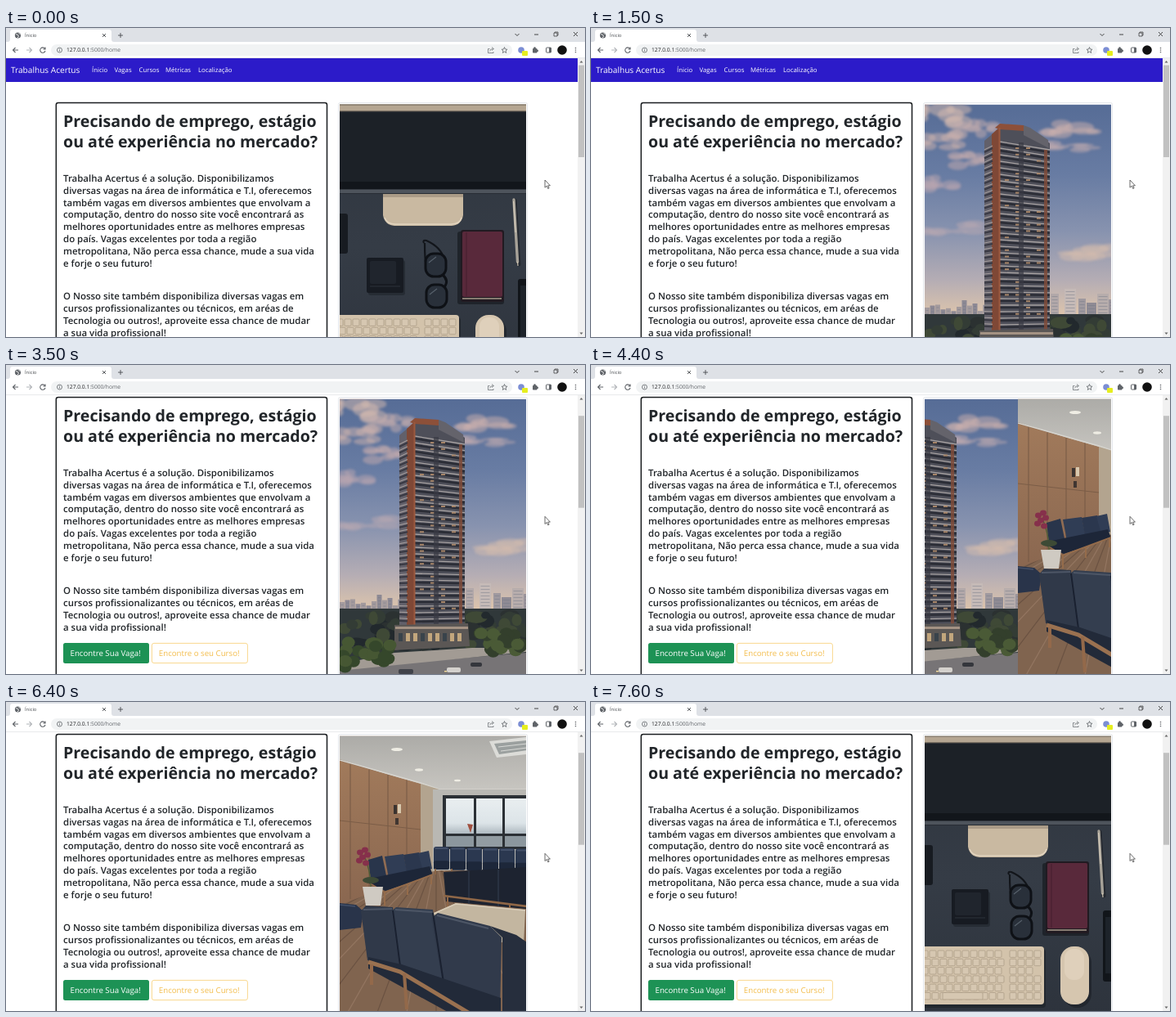
An HTML page that plays this animation: 708x378 px, repeating every 8000 ms.

```html
<!DOCTYPE html>
<html lang="pt">
<head>
<meta charset="utf-8">
<title>Ínicio</title>
<style>
html, body { margin: 0; width: 100%; height: 100%; overflow: hidden; background: #fff; }
svg { display: block; width: 708px; height: 378px; }
text { font-family: "Open Sans", "Noto Sans", sans-serif; text-rendering: geometricPrecision; white-space: pre; }
</style>
</head>
<body>
<svg id="stage" viewBox="0 0 708 378" xmlns="http://www.w3.org/2000/svg"></svg>
<script>
const LOOP = 8000, SCROLL = 52, IMG_W = 228;
const SLIDES = [1300, 4300, 7400];

const rect = (x, y, w, h, fill, more = '') =>
  `<rect x="${x}" y="${y}" width="${w}" height="${h}" fill="${fill}" ${more}/>`;
const poly = (pts, fill, more = '') => `<polygon points="${pts}" fill="${fill}" ${more}/>`;
const oval = (x, y, rx, ry, fill, more = '') =>
  `<ellipse cx="${x}" cy="${y}" rx="${rx}" ry="${ry}" fill="${fill}" ${more}/>`;
const line = (d, color, w = 1, more = '') =>
  `<path d="${d}" fill="none" stroke="${color}" stroke-width="${w}" ${more}/>`;
const text = (x, y, size, str, fill = '#212529', weight = 400) =>
  `<text x="${x}" y="${y}" font-size="${size}" fill="${fill}" font-weight="${weight}">${str}</text>`;
const group = (str, more = '') => `<g ${more}>${str}</g>`;
const times = (n, f) => Array.from({ length: n }, (_, i) => f(i)).join('');
const grad = (id, ...stops) => `<linearGradient id="${id}" x1="0" y1="0" x2="0" y2="1">` +
  stops.map(([at, c]) => `<stop offset="${at}" stop-color="${c}"/>`).join('') + '</linearGradient>';

function seeded(seed) {
  return () => (seed = (seed * 16807) % 2147483647) / 2147483647;
}

function desk() {
  const key = (x, y, w = 8) => rect(x, y, w, 8.4, '#d6c7b1', 'rx="1.2" stroke="#a89983" stroke-width=".7"');
  const keys = times(6, r => times(10, c => key(404 + c * 10 + (r % 2) * 3, 356 + r * 10.3)) +
    times(4, c => r === 2 && c === 3 ? '' : key(512 + c * 10, 356 + r * 10.3)));
  return rect(408, 93, 229, 348, 'url(#deskTop)') +
    rect(408, 93, 229, 9, '#b5a692') + rect(408, 93, 229, 2, '#8f8373') +
    rect(408, 101, 229, 1.5, '#776d60') +
    rect(408, 102.5, 229, 95, '#1c2127') + rect(408, 188, 229, 9.5, '#12161b') +
    rect(408, 197.5, 229, 5, '#4e545c') + rect(408, 202, 229, 1, '#282d34') +
    '<path d="M461 203H559V229Q557 241 545 242H475Q463 241 461 229Z" fill="#c9b9a1"/>' +
    rect(461, 203, 98, 4, '#aa9b87') +
    line('M463 232Q466 240 476 240H544Q555 240 557 232', '#e2d4bf', 1.5) +
    rect(404, 227, 14, 49, '#171b21', 'rx="3"') +
    rect(443, 284, 45, 43, '#22272e', 'rx="3" opacity=".7"') +
    rect(441, 281, 45, 43, '#171b22', 'rx="2"') + rect(445, 285, 32, 28, '#20252d', 'rx="2"') +
    line('M445 316H482', '#2c323b') +
    line('M511 263Q509 259 514 260Q532 268 536 283M512 263Q512 284 514 292', '#12151a', 2.2) +
    rect(513, 276, 25, 28, '#29303a', 'rx="10" stroke="#0e1116" stroke-width="3"') +
    rect(514, 314, 25, 28, '#29303a', 'rx="10" stroke="#0e1116" stroke-width="3"') +
    line('M534 302Q542 309 536 317', '#0e1116', 3) +
    line('M517 287L526 280M518 326L527 319', '#56606b', 1.2) +
    rect(552, 249, 57, 89, '#191c22', 'rx="3" opacity=".75"') +
    rect(556, 247, 53, 88, '#211a21', 'rx="3"') + rect(558, 249, 49, 80, '#59293b', 'rx="2"') +
    line('M558 331H606', '#a99b8c', 1.3) + line('M563 250V328', '#482131', 1.2) +
    line('M622 211L627 289', '#181b20', 5, 'stroke-linecap="round" opacity=".55"') +
    line('M621 210L625.5 286', '#a7a298', 3.4, 'stroke-linecap="round"') +
    line('M620.5 212L623 250', '#ddd3c2', 1) + line('M625.5 286L626 291', '#cfc4b2', 1.2) +
    rect(626, 307, 16, 87, '#11151a', 'rx="3"') + rect(629, 315, 12, 69, '#1d232a') +
    rect(400, 354, 156, 72, '#1c2026', 'rx="4" opacity=".6"') +
    rect(398, 351, 156, 71, '#d3c3ab', 'rx="4"') + keys +
    rect(430, 407.5, 49, 8.4, '#d6c7b1', 'rx="1.2" stroke="#a89983" stroke-width=".7"') +
    rect(577, 354, 35, 72, '#1b1f25', 'rx="17" opacity=".6"') +
    rect(574, 351, 35, 71, '#d6c6af', 'rx="16"') + rect(579, 354, 24, 38, '#e4d7c3', 'rx="11" opacity=".6"');
}

function tower() {
  const rnd = seeded(41);
  const cloud = (x, y, w, h, c) => times(9, () =>
    oval(x + (rnd() - .5) * w, y + (rnd() - .5) * h, w * (.15 + rnd() * .14), h * (.2 + rnd() * .22), c, 'opacity=".5"'));
  const clouds = cloud(428, 104, 62, 24, '#d8bcb0') + cloud(428, 138, 48, 16, '#d0b3ad') +
    cloud(473, 124, 40, 16, '#c5adae') + cloud(464, 162, 46, 14, '#c6abad') +
    cloud(428, 190, 44, 14, '#b9a6b0') + cloud(590, 121, 62, 16, '#cdb1ad') +
    cloud(578, 145, 60, 9, '#c1abb0') + cloud(436, 245, 68, 12, '#b8a8b2') +
    cloud(600, 275, 78, 14, '#d4bbae');
  const block = (x, y, w, c) => rect(x, y, w, 354 - y, c) +
    times(Math.floor((350 - y) / 4), i => rect(x + 1.5, y + 3 + i * 4, w - 3, 1, '#6f7684', 'opacity=".45"'));
  const floors = times(29, i => {
    const y = 145 + i * 7.8, rise = 4 - i * .2;
    return line(`M500 ${y - rise - 2}L561 ${y + rise}`, '#a5a0a0', 1.3) +
      line(`M500 ${y - rise + 1}L561 ${y + rise + 3}`, '#2b2d36', 2.6) +
      line(`M481 ${y + rise}L491 ${y - 1}`, '#a29b9b', 1.1) +
      line(`M481 ${y + rise + 3}L491 ${y + 2}`, '#3a3a44', 2.2) +
      times(4, k => rnd() > .55 ? rect(506 + k * 13, y + 1, 5, 2, '#a58468') : '');
  });
  const trees = times(70, () => {
    const y = 356 + rnd() * 44;
    return oval(408 + rnd() * 229, y, 5 + rnd() * 9, 4 + rnd() * 5,
      ['#2b3131', '#333c35', '#3f4936', '#22292d'][Math.floor(rnd() * 4)]);
  });
  return rect(408, 93, 229, 348, 'url(#sky)') + group(clouds, 'filter="url(#soft)"') +
    times(12, i => block(408 + i * 6.5, 333 + rnd() * 14, 6, i % 2 ? '#8d8994' : '#a39a9d')) +
    block(562, 325, 10, '#b2a8a9') + block(579, 319, 14, '#c5bab7') + block(596, 331, 9, '#9f999f') +
    block(606, 336, 12, '#8f8b94') + block(619, 325, 14, '#b7adac') + block(633, 332, 6, '#9b959c') +
    rect(408, 350, 229, 91, '#30383a') + trees +
    poly('481,138 500,122 500,385 481,385', '#62606a') +
    poly('490,130 500,121 500,385 490,385', '#7f4836') +
    poly('500,121 531,120 561,141 561,380 500,385', '#4e4f59') +
    poly('494,122 500,117 529,119 529,126 500,124', '#8d5039') +
    poly('529,119 537,122 559,137 560,147 529,131', '#64636b') + floors +
    rect(523, 140, 6, 233, '#383a44', 'opacity=".7"') + rect(554, 149, 4, 227, '#7f4c3a', 'opacity=".85"') +
    line('M499.5 122V382', '#9b583e', 2) +
    poly('475,370 565,368 567,396 475,401', '#5b5755') + rect(476, 372, 89, 3, '#a39283') +
    times(9, i => rect(480 + i * 9, 380, 5, 10, i % 3 ? '#c2a67d' : '#39434b')) +
    poly('408,423 636,404 636,441 408,441', '#777476') +
    poly('408,418 475,404 570,398 636,398 636,403 408,426', '#a29b94') +
    times(22, i => oval(412 + rnd() * 58, 390 + rnd() * 32, 8, 7, i % 2 ? '#465733' : '#35472b')) +
    times(24, i => oval(578 + rnd() * 58, 380 + rnd() * 23, 8, 7, i % 2 ? '#4a5a36' : '#333f2c')) +
    rect(539, 422, 17, 6, '#d4d1cd', 'rx="2"') + rect(568, 416, 14, 5, '#34363c', 'rx="2"') +
    rect(480, 424, 18, 6, '#41434a', 'rx="2"') + rect(536, 426, 3, 1.4, '#f4dc9c');
}

function room() {
  const seat = (x, y, w, h) => rect(x, y, w, h, '#2b3850', 'rx="3"') +
    rect(x + 1.5, y + 1, w - 3, 2, '#435069', 'rx="1"') + rect(x, y + h * .62, w, h * .38, '#1d273a', 'rx="2"');
  const art = rect(408, 41, 229, 348, '#80644f') +
    times(15, i => line(`M${535 - i * 3} 205L${640 - i * 38} 390`, i % 2 ? '#6a5242' : '#937661', 1.2)) +
    poly('408,41 637,41 637,112 527,108 408,70', 'url(#ceiling)') +
    poly('591,48 637,43 637,64 600,68', '#dcdcd8') + poly('597,51 637,47 637,59 603,64', '#9ba09f') +
    line('M602 55L637 51M605 60L637 56', '#d8d9d6') +
    oval(478, 58, 7, 2, '#efede4') + oval(505, 83, 5, 1.7, '#efede4') + oval(552, 96, 4, 1.3, '#efede4') +
    poly('408,72 507,100 507,212 408,248', 'url(#wood)') +
    times(4, i => line(`M${421 + i * 23} ${76 + i * 6.5}V${241 - i * 8}`, '#755844', 1)) +
    line('M408 145L507 156', '#7b5d47') + line('M408 71L507 99L530 107H637', '#d6d4ce', 1.6) +
    poly('507,100 530,107 530,206 507,210', '#b3a48f') + rect(522, 107, 115, 99, '#b9b8b3') +
    rect(534, 114, 103, 66, '#2b3035') +
    rect(538, 118, 34, 43, 'url(#glass)') + rect(575, 118, 32, 43, 'url(#glass)') + rect(610, 118, 27, 43, 'url(#glass)') +
    rect(538, 164, 34, 13, '#8c979e') + rect(575, 164, 32, 13, '#929ca2') + rect(610, 164, 27, 13, '#8c979e') +
    poly('564,149 571,150 568,160', '#a0503f') +
    rect(474, 126, 4, 11, '#3a3330') + rect(479, 125, 4, 11, '#d8c8ad') + rect(476, 142, 4, 8, '#403631') +
    times(6, i => seat(523 + i * 20, 177 + i * .5, 19, 28)) +
    line('M525 204V211M545 204V211', '#8b6648', 2) +
    poly('408,246 428,248 437,256 434,276 408,279', '#29344a') + line('M408 248L427 250', '#435069', 1.5) +
    poly('443,193 460,188 467,222 447,225', '#29354b') + poly('463,189 486,186 492,215 469,220', '#303d55') +
    poly('486,187 505,184 511,208 491,213', '#2b374e') + poly('504,185 517,182 521,204 510,207', '#303d55') +
    poly('444,216 518,201 522,212 464,231 444,222', '#1d2638') +
    line('M447 223L463 233L522 211M463 232V249M520 212V223M446 222V236M491 222V236', '#956c4b', 2) +
    line('M446 226Q446 207 438 188', '#4d5d36', 1.4) +
    [[433, 184], [439, 181], [436, 190], [442, 187], [432, 194], [440, 197]].map(([x, y]) =>
      oval(x, y, 4, 3.4, '#86304b')).join('') +
    oval(446, 218, 10, 4, '#3d4a35') + poly('436,226 461,226 458,249 440,249', '#cfcac2') +
    poly('535,208 637,202 637,253 538,244', '#1d2330') +
    line('M566 207V247M602 205V250', '#2d3647', 1.5) + line('M535 237L637 250', '#8f6747', 2.5) +
    line('M540 239V254M616 248V260', '#8f6747', 2) +
    poly('514,262 550,246 635,254 633,296 606,294 520,270', '#c3b6a0') +
    line('M514 263L550 247L635 255', '#d9cdb9', 1.5) +
    poly('434,256 440,249 473,251 481,322 442,316', '#303949') +
    poly('471,256 477,251 522,254 535,340 481,324', '#343e4f') +
    poly('520,264 528,258 592,274 606,288 604,378 535,350', '#313a4b') +
    poly('592,274 607,288 607,378 637,378 637,294 624,285', '#262e3d') +
    line('M437 254L472 253M476 254L521 257M527 261L590 277', '#4d5666', 2) +
    line('M473 255L482 323M522 258L535 343', '#1a2130', 2) +
    poly('443,312 484,321 605,362 605,390 560,390 443,326', '#222a39') +
    line('M443 318L482 330L572 384', '#9a7150', 5) + line('M447 321V346M487 332L490 376', '#93694a', 4);
  return group(art, `transform="translate(0 ${SCROLL})"`);
}

function page() {
  const links = [[105, 'Ínicio'], [132.5, 'Vagas'], [162.5, 'Cursos'], [195, 'Métricas'], [235, 'Localização']];
  const intro = ['Trabalha Acertus é a solução. Disponibilizamos',
    'diversas vagas na área de informática e T.I, oferecemos',
    'também vagas em diversos ambientes que envolvam a',
    'computação, dentro do nosso site você encontrará as',
    'melhores oportunidades entre as melhores empresas',
    'do país. Vagas excelentes por toda a região',
    'metropolitana, Não perca essa chance, mude a sua vida', 'e forje o seu futuro!'];
  const more = ['O Nosso site também disponibiliza diversas vagas em',
    'cursos profissionalizantes ou técnicos, em aréas de',
    'Tecnologia ou outros!, aproveite essa chance de mudar', 'a sua vida profissional!'];
  const para = (lines, y) => lines.map((s, i) => text(70, y + i * 14.95, 11.45, s, '#212529', 600)).join('');
  const slides = [desk, tower, room, desk].map((f, i) =>
    group(group(f(), 'clip-path="url(#photo)"'), `transform="translate(${i * IMG_W} 0)"`)).join('');
  return rect(0, 37, 699, 29, '#2c1bc9') + text(6, 55.3, 10.1, 'Trabalhus Acertus', '#fff') +
    links.map(([x, s]) => text(x, 54.4, 7.8, s, '#fff')).join('') +
    rect(61.3, 91.4, 331.2, 420, '#fff', 'rx="2.5" stroke="#1a1d20" stroke-width="1.5"') +
    text(70, 121, 19.6, 'Precisando de emprego, estágio', '#212529', 700) +
    text(70, 146, 19.6, 'ou até experiência no mercado?', '#212529', 700) +
    para(intro, 187.6) + para(more, 332.2) +
    rect(70, 392, 105, 25, '#1d9255', 'rx="2.5"') + text(78.5, 408.3, 9.7, 'Encontre Sua Vaga!', '#fff') +
    rect(178.4, 392.4, 117, 24.2, '#fff', 'rx="2.5" stroke="#f9d382" stroke-width=".9"') +
    text(186.8, 408.3, 9.7, 'Encontre o seu Curso!', '#f3bd4d') +
    rect(406.5, 91.5, 231, 400, '#fff', 'rx="2" stroke="#e3e6ea"') +
    group(group(slides, 'id="reel"'), 'clip-path="url(#photo)"');
}

function chrome() {
  const ink = '#5f6368';
  return rect(0, 0, 708, 17, '#dee1e6') +
    '<path d="M2 17Q5 17 5 14V5Q5 2 8 2H126Q129 2 129 5V14Q129 17 132 17Z" fill="#fff"/>' +
    oval(14.5, 9, 3.6, 3.6, ink) + line('M12 8Q14 7 15 9T14 12M15.5 6L17.5 8', '#fff', .9) +
    text(23, 11.2, 5.8, 'Ínicio', '#45494d') +
    line('M118 7L122 11M122 7L118 11', '#4a4d51', .9) + line('M137 9H143M140 6V12', '#4a4d51', .9) +
    line('M622.5 7L625 9.5L627.5 7M646 8H651M694 5L699 10M699 5L694 10', '#333', .9) +
    line('M670 6H674V10H670ZM671 6V5H675V9H674', '#333', .7) +
    rect(0, 17, 708, 20, '#fff') + rect(0, 36.4, 708, .6, '#d9dce0') +
    line('M15 27H8.5M11.5 24L8.5 27L11.5 30', ink, 1.1) +
    line('M25 27H31.5M28.5 24L31.5 27L28.5 30', '#b2b5b9', 1.1) +
    line('M47.5 25.2A3.2 3.2 0 1 0 48 28M48 23.5V26H45.5', ink, 1.1) +
    rect(55, 20, 564, 14, '#f1f3f4', 'rx="7"') +
    oval(65.5, 27, 3, 3, 'none', `stroke="${ink}" stroke-width=".8"`) + line('M65.5 26.5V28.7M65.5 25V25.8', ink, .8) +
    `<text x="74" y="29.4" font-size="6.7" fill="#202124">127.0.0.1<tspan fill="${ink}">:5000/home</tspan></text>` +
    line('M591.5 25.5H589.5V30.5H596V29M591.5 28.5Q592 25.5 595.5 25.5M594 23.5L596.5 25.5L594 27.5', ink, .7) +
    line('M609.5 23.5L610.5 26L613 26.2L611 27.9L611.7 30.4L609.5 29L607.3 30.4L608 27.9L606 26.2L608.5 26Z', ink, .8) +
    oval(630, 27, 3.8, 3.8, '#7c8ed4') + rect(631, 28, 7, 6, '#e6ee20', 'rx="1"') +
    rect(644, 25, 5.5, 5.5, ink, 'rx=".8"') + oval(646.5, 24.7, 1.4, 1.4, ink) + oval(649.6, 27.8, 1.4, 1.4, ink) +
    rect(660.5, 24, 6, 6, 'none', `rx=".8" stroke="${ink}"`) + rect(664, 24, 2.5, 6, ink) +
    oval(680, 27, 5.8, 5.8, '#111') +
    times(3, i => oval(696.5, 24.5 + i * 2.5, .8, .8, ink));
}

const bar = rect(699, 37, 9, 341, '#f1f1f1') + rect(700, 45.5, 7, 112.5, '#c1c1c1', 'id="thumb"') +
  poly('701.5,42.5 703.5,40 705.5,42.5', '#666') + poly('701.5,372.5 703.5,375 705.5,372.5', '#666');
const cursor = group('<path d="M659 186V195.2L661.2 193.2L662.7 196.5L664.1 195.9L662.7 192.8H665.4Z" ' +
  'fill="#fff" stroke="#444" stroke-width=".8" stroke-linejoin="round"/>', 'id="cursor"');
const defs = '<defs>' +
  grad('deskTop', [0, '#2e343d'], [.5, '#353c46'], [1, '#2d333c']) +
  grad('sky', [0, '#566c96'], [.25, '#687ca3'], [.45, '#8893af'], [.62, '#b5adb4'], [.74, '#dcc4ac']) +
  grad('ceiling', [0, '#acaba7'], [1, '#c9c7c2']) + grad('wood', [0, '#a17a5b'], [1, '#8a6750']) +
  grad('glass', [0, '#e9eef0'], [.7, '#dce4e8'], [1, '#aeb9c0']) +
  '<filter id="soft"><feGaussianBlur stdDeviation="1.6"/></filter>' +
  '<clipPath id="photo"><rect x="408" y="93.5" width="228" height="346"/></clipPath></defs>';

const stage = document.getElementById('stage');
stage.innerHTML = defs + rect(0, 0, 708, 378, '#fff') + group(page(), 'id="page"') + bar + chrome() + cursor;
const [pageEl, reel, thumb, pointer] = ['page', 'reel', 'thumb', 'cursor'].map(id => document.getElementById(id));

const move = (el, x, y) => el.setAttribute('transform', `translate(${x} ${y})`);

function draw(ms) {
  const t = Math.floor((ms % LOOP) / 100) * 100;
  const slide = SLIDES.reduce((sum, at) => sum + Math.min(1, Math.max(0, (t - at) / 200)), 0);
  const down = t >= 3500;
  move(pageEl, 0, down ? -SCROLL : 0);
  move(reel, -IMG_W * slide, 0);
  move(thumb, 0, down ? 16.7 : 0);
  move(pointer, 0, t >= 3200 ? -.7 : 0);
}

const start = performance.now();
function tick() {
  draw(performance.now() - start);
  requestAnimationFrame(tick);
}
draw(0);
requestAnimationFrame(tick);
</script>
</body>
</html>
```
